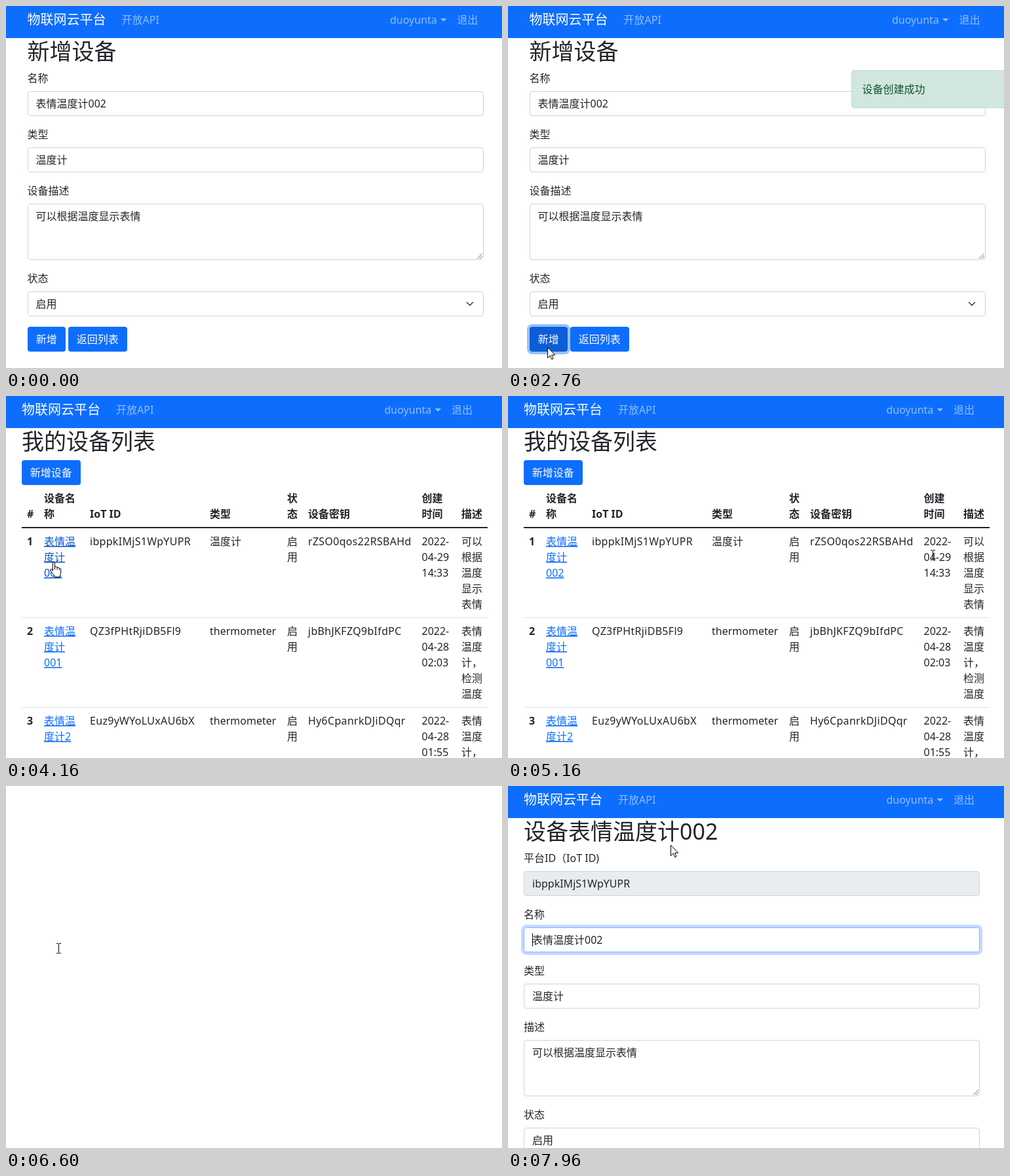
An HTML page that plays this animation: 757x553 px, repeating every 8 s.

```html
<!DOCTYPE html>
<html lang="zh-CN">
<head>
<meta charset="utf-8">
<style>
html, body { margin: 0; width: 100%; height: 100%; overflow: hidden; background: #fff; }
svg { display: block; }
text { font: 16px "Noto Sans", "Noto Sans CJK SC", "Noto Sans CJK", sans-serif; fill: #212529; white-space: pre; }
.title { font-size: 34px; }
.brand { font-size: 20px; fill: #fff; }
.nav { fill: #fff; fill-opacity: .55; }
.bold { font-weight: 700; }
.light { fill: #fff; }
.code { letter-spacing: .3px; }
.link text { fill: #0d6efd; text-decoration: underline; }
.link.hover text { fill: #0a58ca; }
.btn { fill: #0d6efd; }
.btn.hover { fill: #0b5ed7; }
.field { fill: #fff; stroke: #ced4da; }
.readonly { fill: #e9ecef; }
.focus { stroke: #86b7fe; }
.toast { fill: #d1e7dd; stroke: #badbcc; }
.toast-text { fill: #0f5132; }
</style>
</head>
<body>
<svg id="stage" width="757" height="553" viewBox="0 0 757 553"></svg>
<script>
const LOOP = 8000;
const stage = document.getElementById('stage');

const text = (x, y, s, cls = '') => `<text x="${x}" y="${y}" class="${cls}">${s}</text>`;
const lines = (x, y, s, cls) => s.split('/').map((part, i) => text(x, y + i * 24, part, cls)).join('');
const rect = (x, y, w, h, attrs) => `<rect x="${x}" y="${y}" width="${w}" height="${h}" ${attrs}/>`;

const navBar = dx => rect(0, 0, 757, 49, 'fill="#0d6efd"') +
  text(24 + dx, 28, '物联网云平台', 'brand') + text(168 + dx, 27, '开放API', 'nav') +
  text(577.5 + dx, 27, 'duoyunta', 'nav') + text(680 + dx, 27, '退出', 'nav') +
  `<path d="M${654.5 + dx} 19h9.6l-4.8 4.8z" class="nav"/>`;

// dx is the page offset; boxes snap to whole pixels, text does not
const field = (dx, y, label, value, h = 38, cls = '') =>
  text(24 + dx, y - 14, label) +
  rect(24.5 + Math.round(dx), y + .5, 695, h - 1, `rx="3.5" class="field ${cls}"`) +
  text(37 + dx, y + 25, value);

const grip = (x, y) => `<path d="M${x - 10} ${y - 2}l8-8m-4 8l4-4" stroke="#777" fill="none"/>`;

const button = (x, y, w, label, id = '') =>
  rect(x, y, w, 38, `rx="4" class="btn" id="${id}"`) + text(x + 12.7, y + 25, label, 'light');

const formPage = navBar(8.5) + text(32.5, 82, '新增设备', 'title') +
  field(8.5, 130, '名称', '表情温度计002') +
  field(8.5, 216, '类型', '温度计') +
  field(8.5, 302, '设备描述', '可以根据温度显示表情', 86) + grip(729, 388) +
  field(8.5, 436, '状态', '启用') +
  '<path d="M703.5 452.75l4.5 4.5 4.5-4.5" fill="none" stroke="#343a40" stroke-width="1.5" stroke-linecap="round" stroke-linejoin="round"/>' +
  button(33, 490, 58, '新增', 'add') + button(95, 490, 90, '返回列表', 'back') +
  rect(31, 488, 62, 42, 'id="addRing" rx="6" fill="none" stroke="#3184fd" stroke-opacity=".5" stroke-width="4"') +
  '<g id="toast">' + rect(524.5, 98.5, 260, 57, 'rx="3.5" class="toast"') +
  text(540.5, 133, '设备创建成功', 'toast-text') + '</g>';

const rows = [
  ['表情温/度计/002', 'ibppkIMjS1WpYUPR', '温度计', 'rZSO0qos22RSBAHd', '2022-/04-29/14:33', '可以/根据/温度/显示/表情'],
  ['表情温/度计/001', 'QZ3fPHtRjiDB5Fl9', 'thermometer', 'jbBhJKFZQ9bIfdPC', '2022-/04-28/02:03', '表情/温度/计，/检测/温度'],
  ['表情温/度计2', 'Euz9yWYoLUxAU6bX', 'thermometer', 'Hy6CpanrkDJiDQqr', '2022-/04-28/01:55', '表情/温度/计，']
];
const rowBase = i => 228 + i * 137;

const tableRow = ([name, id, type, key, date, note], i) => {
  const y = rowBase(i);
  return text(32, y, i + 1, 'bold') + `<g class="link">${lines(58, y, name)}</g>` +
    text(128, y, id, 'code') + text(311, y, type) + lines(429, y, '启/用') +
    text(461, y, key, 'code') + lines(634.5, y, date) + lines(695, y, note) +
    rect(24, y + 110, 711, 1, 'fill="#dee2e6"');
};

const listPage = navBar(0) + text(24, 82, '我的设备列表', 'title') +
  button(24, 98, 90, '新增设备') +
  text(32, 186, '#', 'bold') + lines(58, 162, '设备名/称', 'bold') + text(128, 186, 'IoT ID', 'bold') +
  text(311, 186, '类型', 'bold') + lines(429, 162, '状/态', 'bold') + text(461, 186, '设备密钥', 'bold') +
  lines(634.5, 162, '创建/时间', 'bold') + text(695, 186, '描述', 'bold') +
  rect(24, 200, 711, 2, 'fill="#212529"') + rows.map(tableRow).join('');

const detailPage = navBar(0) + text(24, 82, '设备表情温度计002', 'title') +
  field(0, 130, '平台ID（IoT ID)', 'ibppkIMjS1WpYUPR', 38, 'readonly') +
  rect(22, 214, 700, 42, 'id="nameRing" rx="6" fill="none" stroke="#0d6efd" stroke-opacity=".25" stroke-width="4"') +
  field(0, 216, '名称', '表情温度计002', 38, 'focus') + rect(37, 225, 1, 20, 'id="caret"') +
  field(0, 302, '类型', '温度计') +
  field(0, 388, '描述', '可以根据温度显示表情', 86) + grip(720, 474) +
  field(0, 522, '状态', '启用');

const pointers = {
  arrow: '<path d="M.5.5V16.5L4.2 13l2.6 5.8 2.3-1L6.6 12.2H11.8z" fill="#fff" stroke="#000"/>',
  hand: `<path d="M-1.5 14V2Q-1.5.5 0 .5T1.5 2V8.5Q1.8 7.5 3.2 7.6 4.8 7.8 5 9.3 5.4 8.4 6.8 8.7 8.2 9 8.4 10.5 8.8 9.9 9.8 10.3 10.8 10.7 10.8 12.5V16Q10.8 18.5 9.5 20.5V23.5H1V21.5L-4.8 14.5Q-6 12.8-5 12-3.8 11-1.5 14z" fill="#fff" stroke="#000"/>
    <path d="M1.5 8v4M5 9v3.5M8.4 10v3" stroke="#000"/>`,
  beam: '<path d="M-3-7.5H0M1-7.5H4M.5-7V7M-3 7.5H0M1 7.5H4" stroke="#000" shape-rendering="crispEdges"/>'
};

const group = (id, body) => `<g id="${id}">${body}</g>`;
stage.innerHTML = group('form', formPage) + group('list', listPage) + group('detail', detailPage) +
  group('pointer', Object.entries(pointers).map(([id, body]) => group(id, body)).join(''));

const el = id => document.getElementById(id);
const show = (id, on) => { el(id).style.display = on ? '' : 'none'; };
const fade = (id, v) => { el(id).style.opacity = Math.max(0, Math.min(1, v)); };
const links = [...document.querySelectorAll('.link')];

// Pointer route: time, x, y
const route = [
  [0, 532, 600], [560, 532, 600], [640, 532, 545], [1440, 60, 521], [3360, 60, 521],
  [4160, 73, 253], [4240, 124, 250], [4880, 667, 243], [5080, 667, 243], [5800, 102, 257],
  [5960, 96, 249], [6240, 80, 248], [6880, 80, 248], [7360, 225, 160], [7440, 225, 160],
  [7960, 248, 90], [LOOP, 248, 90]
];

function pointerAt(t) {
  const i = route.findIndex(p => p[0] > t);
  const [t0, x0, y0] = route[i - 1], [t1, x1, y1] = route[i];
  const u = Math.floor((t - t0) / 80) * 80 / (t1 - t0); // the screen refreshes every 80 ms
  const e = u * u * (3 - 2 * u);
  return [Math.round(x0 + (x1 - x0) * e), Math.round(y0 + (y1 - y0) * e)];
}

const inside = (x, y, l, t, r, b) => x >= l && x < r && y >= t && y < b;
const widths = { '表情温': 48, '度计': 32, '度计2': 41 };
const overLink = (x, y, i) => rows[i][0].split('/').some((s, n) => {
  const base = rowBase(i) + n * 24;
  return inside(x, y, 58, base - 15, 58 + (widths[s] || 28), base + 6);
});

function draw(t) {
  const page = t < 2920 ? 'form' : t < 6520 ? 'list' : t < 6680 ? 'blank' : 'detail';
  const [x, y] = pointerAt(t);
  let kind = 'arrow';
  for (const id of ['form', 'list', 'detail']) show(id, id === page);

  if (page === 'form') {
    const add = inside(x, y, 33, 490, 91, 528), back = inside(x, y, 95, 490, 185, 528);
    el('add').classList.toggle('hover', add);
    el('back').classList.toggle('hover', back);
    fade('addRing', (Math.floor((t - 2520) / 80) + 1) / 3);
    show('toast', t >= 2760);
    if ((add || back) && t < 2760) kind = 'hand';
  } else if (page === 'list') {
    links.forEach((link, i) => {
      const over = overLink(x, y, i);
      link.classList.toggle('hover', over);
      if (over) kind = 'hand';
    });
    if (inside(x, y, 429, 237, 445, 258) || inside(x, y, 634, 237, 679, 258)) kind = 'beam';
  } else {
    if (inside(x, y, 24, 130, 720, 168) || inside(x, y, 24, 216, 720, 254)) kind = 'beam';
    fade('nameRing', t < 6800 ? .5 : 1);
    show('caret', (t - 6680) % 1000 < 520);
  }

  for (const id in pointers) show(id, id === kind);
  el('pointer').setAttribute('transform', `translate(${x} ${y})`);
}

const start = performance.now();
function tick() {
  draw((performance.now() - start) % LOOP);
  requestAnimationFrame(tick);
}
tick();
</script>
</body>
</html>
```
